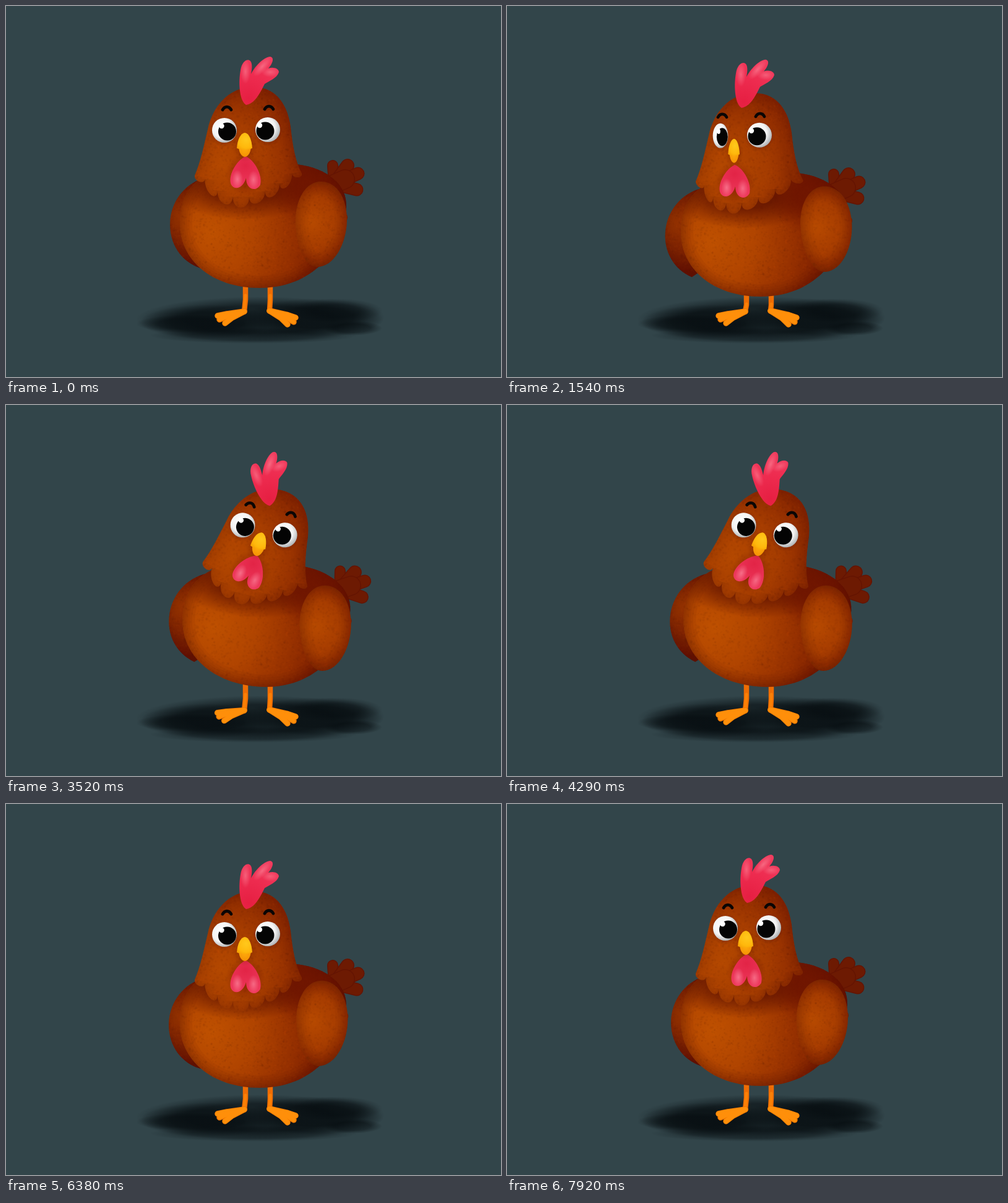
These frames come from a looping animation (800x600 px, 8000 ms). An HTML page with a canvas:

```html
<!DOCTYPE html>
<html lang="en">
<head>
<meta charset="utf-8">
<title>Hen</title>
<style>
html, body { margin: 0; width: 100%; height: 100%; overflow: hidden; background: #32454a; }
canvas { display: block; width: 800px; height: 600px; }
</style>
</head>
<body>
<canvas id="stage" width="800" height="600"></canvas>
<script>
const g = document.getElementById('stage').getContext('2d');
const LOOP = 8000, STEP = 110, RAD = Math.PI / 180;

// Eased value between [time, value] keys
function track(t, keys) {
  if (t <= keys[0][0]) return keys[0][1];
  for (let i = 1; i < keys.length; i++) {
    const [t1, b] = keys[i], [t0, a] = keys[i - 1];
    if (t < t1) return a + (b - a) * (1 - Math.cos(Math.PI * (t - t0) / (t1 - t0))) / 2;
  }
  return keys[keys.length - 1][1];
}

function radial(x, y, r, ...stops) {
  const grad = g.createRadialGradient(x, y, 0, x, y, r);
  stops.forEach(([at, color]) => grad.addColorStop(at, color));
  return grad;
}

// Painted grain, tiled over the feathers
function makeGrain() {
  const tile = document.createElement('canvas');
  tile.width = tile.height = 256;
  const c = tile.getContext('2d');
  let seed = 7;
  const rnd = () => (seed = seed * 16807 % 2147483647) / 2147483647;
  for (let i = 0; i < 5000; i++) {
    c.fillStyle = rnd() < .5 ? 'rgba(60,6,0,.05)' : 'rgba(225,95,0,.04)';
    c.beginPath();
    c.arc(rnd() * 256, rnd() * 256, .5 + rnd() * 1.7, 0, 7);
    c.fill();
  }
  return g.createPattern(tile, 'repeat');
}
const grain = makeGrain();

function group(draw) { g.save(); draw(); g.restore(); }

function turnAbout(x, y, deg, sx = 1) {
  g.translate(x, y);
  g.rotate(deg * RAD);
  g.scale(sx, 1);
  g.translate(-x, -y);
}

function paint(path, fill, rim = 0) {
  g.fillStyle = fill;
  g.fill(path);
  if (!rim) return;
  g.fillStyle = grain;
  g.fill(path);
  group(() => {
    g.clip(path);
    g.strokeStyle = `rgba(60,6,0,${rim})`;
    for (const w of [40, 31, 23, 16, 10, 5]) { g.lineWidth = w; g.stroke(path); }
  });
}

// Soft-edged ellipse
function soft(x, y, rx, ry, rgb, alpha, core = 0) {
  group(() => {
    g.translate(x, y);
    g.scale(rx, ry);
    g.fillStyle = radial(0, 0, 1, [0, `rgba(${rgb},${alpha})`], [core, `rgba(${rgb},${alpha})`], [1, `rgba(${rgb},0)`]);
    g.fillRect(-1, -1, 2, 2);
  });
}

function dot(x, y, r, fill) {
  g.fillStyle = fill;
  g.beginPath();
  g.arc(x, y, r, 0, 7);
  g.fill();
}

function line(width, color, ...pts) {
  g.lineWidth = width;
  g.strokeStyle = color;
  g.lineCap = g.lineJoin = 'round';
  g.beginPath();
  pts.forEach(([x, y]) => g.lineTo(x, y));
  g.stroke();
}

function arch(x, y, w, h, width) {
  g.lineWidth = width;
  g.strokeStyle = '#0a0605';
  g.lineCap = 'round';
  g.beginPath();
  g.moveTo(x - w, y);
  g.bezierCurveTo(x - w * .5, y - h, x + w * .5, y - h, x + w, y);
  g.stroke();
}

const BODY = new Path2D('M288 312C300 280 340 256 400 254L470 256C520 262 552 290 550 325C545 402 490 456 410 456C332 456 281 410 281 352C281 338 284 322 288 312Z');
const WING = new Path2D('M509 284C535 284 552 312 551 348C550 385 530 422 503 422C482 422 468 385 468 348C468 312 485 284 509 284Z');
const BACK_WING = new Path2D('M318 279C288 288 265 318 265 353C265 392 290 418 318 425L345 400L345 290Z');
const COMB = new Path2D('M388 160C376 152 376 120 379 104C381 90 390 84 395 89C399 94 397 104 396 110C402 98 415 84 426 82C434 82 432 92 424 101C432 98 441 101 441 107C438 117 424 122 418 126C410 142 402 158 388 160Z');
const WATTLE = new Path2D('M387 243C371 251 358 276 364 289C369 298 383 296 388 278C388 298 405 301 411 289C415 274 402 249 387 243Z');
const BEAK = new Path2D('M373 230C374 216 379 206 386 205C393 206 397 216 398 230C391 233 380 233 373 230Z');
const JAW = new Path2D('M376 223Q386 218 396 223C397 234 392 244 386 244C380 244 375 234 376 223Z');
const FEATHERS = [[527, 166], [546, 167], [567, 191], [588, 208], [602, 231], [611, 256], [613, 282], [610, 306], [600, 325]];
const COLLAR = [[312, 284], [331, 305], [353, 320], [380, 326], [406, 319], [431, 308], [453, 293], [471, 277]];

function shadow() {
  const c = '5,11,14';
  soft(410, 507, 200, 37, c, .6, .6);
  soft(325, 511, 108, 28, c, .55, .55);
  soft(500, 504, 112, 31, c, .6, .55);
  soft(300, 514, 90, 15, c, .45, .6);
  soft(535, 493, 74, 20, c, .45, .5);
  soft(400, 533, 168, 13, c, .35, .6);
  soft(560, 521, 48, 12, c, .45, .6);
}

function leg(pose, right) {
  group(() => {
    g.translate(0, -pose.hop);
    const shade = '#f07400', hue = '#ff8f0a';
    const hip = right ? [427, 430] : [387, 430], heel = right ? [426, 493] : [385, 494];
    line(8.5, '#ee6c04', hip, [hip[0], 475 + pose.dip * .6], heel);
    line(5, '#fb8006', [hip[0], 468 + pose.dip], heel);
    if (!right) turnAbout(388, 494, 8 * pose.tap);
    const toes = right ? [[468, 504], [465, 511], [455, 515]] : [[342, 501], [345, 507], [354, 513]];
    const bends = toes.map(([x, y]) => [heel[0] + (x - heel[0]) * .65, heel[1] + (y - heel[1]) * .55]);
    toes.forEach((toe, i) => line(9.5, shade, heel, bends[i], toe));
    line(8, hue, heel, bends[0], bends[2], heel);
    toes.forEach((toe, i) => line(i == 1 ? 7 : 8.3, hue, bends[i], toe));
  });
}

function tail() {
  [[528, 258, 9], [552, 258, 11], [569, 271, 10.5], [567, 297, 10.5], [548, 280, 16]].forEach(([x, y, r]) => {
    line(2 * r, '#641402', [530, 288], [x, y]);
    line(2 * r - 3, '#6d1a02', [530, 288], [x, y]);
  });
}

function fan(left) {
  const low = left ? 324 : 350;
  const fill = radial(525, 300, 150, [0, left ? '#862c02' : '#a84000'], [.45, left ? '#7a2201' : '#962f00'], [.8, '#741a01'], [1, '#560e01']);
  FEATHERS.forEach((tip, i) => {
    const width = Math.min(22, 18 + i);
    line(width, '#661401', [545, 285], tip);
    line(width - 1.5, fill, [545, 285], tip);
  });
  paint(new Path2D(`M518 185C515 212 500 235 495 264C494 312 530 ${low} 568 ${low}C588 ${low} 600 342 604 328C592 298 578 262 552 242L524 205Z`), fill, .008);
}

function leftWing(p) {
  group(() => {
    if (p.open < .5) {
      turnAbout(312, 288, p.dip / 14 * 8 + p.tilt * (5 + p.dip * 1.8) + p.open * 140);
      paint(BACK_WING, radial(278, 340, 85, [0, '#983400'], [.45, '#822501'], [1, '#641301']), .03);
    } else {
      g.translate(828, 15);
      g.scale(-1, 1);
      turnAbout(510, 300, (1 - p.open) * 120);
      fan(true);
    }
  });
}

function rightWing(p) {
  group(() => {
    if (p.open < .5) {
      g.translate(p.dip * .2 - 3 * p.tilt, -p.dip * .42);
      turnAbout(505, 295, -p.dip / 14 * 4 - p.tilt * 6 - p.open * 140);
      dot(544, 342, 8, '#741b01');
      dot(541, 355, 8, '#741b01');
      paint(WING, radial(494, 350, 84, [0, '#b64900'], [.5, '#a63c00'], [1, '#7c2000']), .035);
    } else {
      turnAbout(510, 300, (1 - p.open) * 120);
      fan(false);
    }
  });
}

function body() {
  paint(BODY, radial(332, 366, 235, [0, '#be5000'], [.3, '#b04400'], [.58, '#942f00'], [.82, '#761a00'], [1, '#651200']), .05);
  group(() => {
    g.clip(BODY);
    soft(385, 292, 125, 54, '92,16,0', .75, .4);
    soft(492, 290, 70, 66, '108,18,0', .7, .35);
  });
}

function headShape(turn) {
  const tips = COLLAR.map(([x, y], i) => [x - 14 * turn * Math.sin(Math.PI * i / 7), y]);
  const path = new Path2D('M400 131C440 131 456 165 460 195C463 225 468 252 478 271');
  let from = [478, 271];
  for (let i = tips.length - 1; i >= 0; i--) {
    const [x, y] = tips[i];
    const to = i ? [(x + tips[i - 1][0]) / 2, (y + tips[i - 1][1]) / 2 - 14] : [305, 274];
    const dx = (x - (from[0] + to[0]) / 2) * 4 / 3, dy = (y - (from[1] + to[1]) / 2) * 4 / 3;
    path.bezierCurveTo(from[0] + dx, from[1] + dy, to[0] + dx, to[1] + dy, ...to);
    from = to;
  }
  path.bezierCurveTo(314, 254, 320, 225, 326, 200);
  path.bezierCurveTo(333, 165, 358, 131, 400, 131);
  path.closePath();
  return path;
}

function eye(x, y, px, py, shut) {
  soft(x, y + 2, 25, 25, '80,15,0', .3, .6);
  if (shut) {
    dot(x, y, 20, radial(x, y - 5, 26, [0, '#ac4400'], [.6, '#a23b00'], [1, '#7a2000']));
    arch(x, y + 4, 13, 11, 7);
    return;
  }
  dot(x, y, 20, radial(x - 4, y - 4, 26, [0, '#fff'], [.6, '#f4f4f4'], [1, '#a9adb0']));
  dot(px, py, 14.5, '#040404');
  dot(px - 9, py - 9, 4.2, '#fff');
}

function head(p) {
  group(() => {
    g.translate(0, -p.hop + p.dip * .7 + p.nod);
    turnAbout(395, 318, 14 * p.tilt);
    const turn = p.turn, browLift = -13 * p.gape;
    paint(headShape(turn), radial(350, 255, 155, [0, '#b34800'], [.45, '#a53c00'], [.8, '#8c2900'], [1, '#7e2000']), .018);

    group(() => {
      g.translate(-8 * turn, -turn);
      turnAbout(353, 201, 0, 1 - .38 * turn);
      eye(353, 201, 357.5, 203, p.shut);
    });
    group(() => {
      g.translate(-15 * turn, -turn);
      eye(423, 200, 419, 202, p.shut);
    });
    arch(357 - 9 * turn, 168 + 2 * turn + browLift, 7, 6.5, 4.8);
    arch(425 - 16 * turn, 167 + 2 * turn + browLift, 7, 6.5, 4.8);

    group(() => {
      g.translate(-19 * turn - 2 * p.gape, 4 * turn + 9 * p.gape);
      turnAbout(387, 245, 4 * p.gape + 10 * p.tilt, 1 - .08 * p.gape);
      soft(387, 272, 32, 34, '110,16,0', .4, .4);
      paint(WATTLE, radial(387, 258, 44, [0, '#e22446'], [1, '#f03c60']));
      soft(374, 280, 9, 15, '255,150,170', .6);
      soft(400, 281, 9, 15, '255,150,170', .55);
    });
    group(() => {
      g.translate(-19 * turn, 0);
      turnAbout(386, 225, 0, 1 - .25 * turn);
      soft(386, 228, 20, 24, '90,16,0', .3, .3);
      group(() => {
        g.translate(0, 11 * p.gape);
        paint(JAW, radial(386, 230, 18, [0, '#ffac0c'], [1, '#f28a02']));
      });
      paint(BEAK, radial(388, 216, 22, [0, '#ffc81c'], [.6, '#ffb80c'], [1, '#f29600']));
    });
    group(() => {
      g.translate(-9 * turn, -5 * turn);
      turnAbout(388, 160, -37 * p.tilt - 10.5 * p.gape);
      paint(COMB, radial(392, 150, 80, [0, '#e61f42'], [.5, '#ee2c50'], [1, '#f03e60']));
      group(() => {
        g.clip(COMB);
        soft(387, 106, 8, 20, '255,155,170', .45);
        soft(427, 107, 14, 8, '255,155,170', .4);
        g.translate(414, 98);
        g.rotate(42 * RAD);
        soft(0, 0, 8, 20, '255,155,170', .5);
      });
    });
  });
}

function poseAt(t) {
  const u = (t - 5390) / 690;
  return {
    dip: track(t, [[0, 0], [510, 14], [1030, 0], [1540, 14], [2050, 0], [2400, 6], [2750, 0], [3135, 7], [3520, 0],
      [3905, 6], [4290, 0], [4700, 0], [5200, 15], [5390, 6], [5500, 4], [5735, 0], [6080, 2], [6220, 14], [6380, 3],
      [6890, 0], [7400, 14], [7920, 0]]),
    nod: track(t, [[4900, 0], [5200, 4], [5500, -4], [5735, -3], [6080, 0], [6220, 10], [6380, 8], [6800, 0]]),
    tilt: track(t, [[1760, 0], [2200, 1], [4400, 1], [4850, 0]]),
    turn: track(t, [[220, 0], [660, 1], [1600, 1], [2000, 0]]),
    open: track(t, [[4900, 0], [5250, 1], [6120, 1], [6360, 0]]),
    gape: track(t, [[4950, 0], [5200, 1], [6100, 1], [6300, 0]]),
    hop: u > 0 && u < 1 ? 60 * 4 * u * (1 - u) : 0,
    tap: t > 2200 && t < 4400 ? .5 + .5 * Math.cos(2 * Math.PI * (t - 2750) / 440) : 0,
    shut: t >= 4950 && t < 6250
  };
}

function draw(now) {
  const p = poseAt(Math.floor(now % LOOP / STEP) * STEP);
  const place = () => {
    g.translate(0, p.dip - p.hop);
    turnAbout(415, 400, 5 * p.tilt);
  };
  g.fillStyle = '#32454a';
  g.fillRect(0, 0, 800, 600);
  shadow();
  leg(p, false);
  leg(p, true);
  group(() => { place(); tail(); leftWing(p); body(); });
  head(p);
  group(() => { place(); rightWing(p); });
}

let start;
function frame(now) {
  start ??= now;
  draw(now - start);
  requestAnimationFrame(frame);
}
requestAnimationFrame(frame);
</script>
</body>
</html>
```
